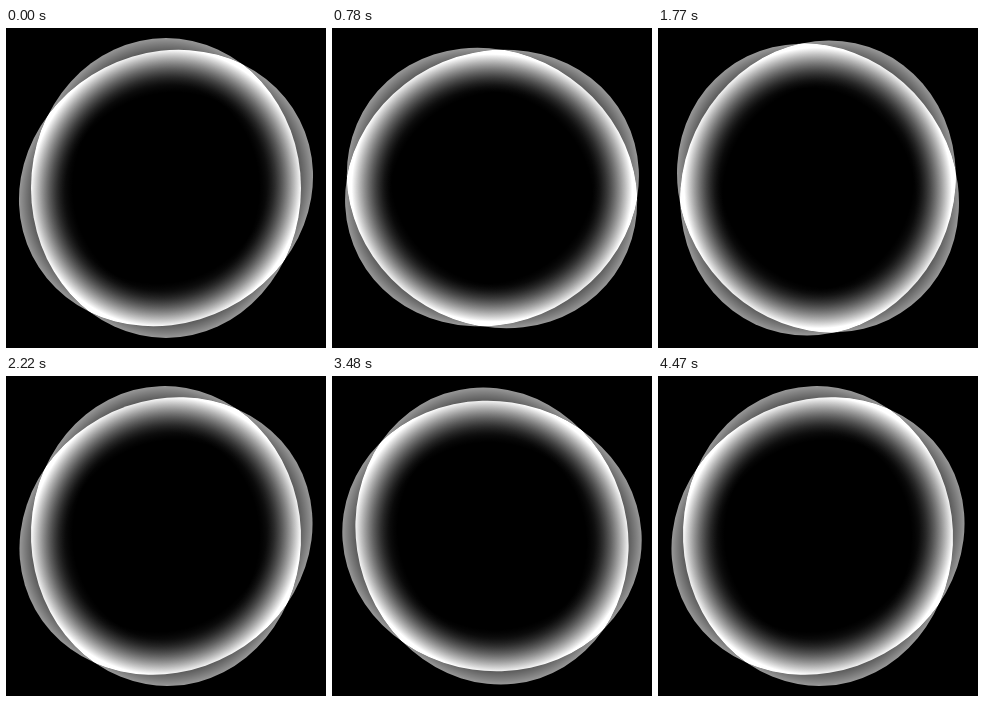
An HTML page with a canvas for the animation above (4500 ms loop, 320 by 320 pixels).

```html
<!DOCTYPE html>
<html lang="en">
<head>
<meta charset="utf-8">
<title>Turning rings</title>
<style>
  html, body { margin: 0; width: 100%; height: 100%; overflow: hidden; background: #000; }
  canvas { display: block; width: 320px; height: 320px; }
</style>
</head>
<body>
<canvas id="stage" width="320" height="320"></canvas>
<script>
const ctx = document.getElementById('stage').getContext('2d');
const SIZE = 320;
const LOOP = 4500;
const STEP = 30;
const LONG = 150;
const SHORT = 135;
const GLOW_DEPTH = 0.31;   // share of the radius that the glow reaches inward
const EDGE_LIGHT = 0.6;
const START_ANGLES = [-27, 90];

// Brightest at the rim, easing out to nothing toward the centre.
function makeGlow() {
  const glow = ctx.createRadialGradient(0, 0, 0, 0, 0, 1);
  const stops = 12;
  for (let i = 0; i <= stops; i++) {
    const k = i / stops;
    const light = EDGE_LIGHT * Math.pow(k, 1.5);
    glow.addColorStop(1 - GLOW_DEPTH * (1 - k), `rgba(255,255,255,${light})`);
  }
  return glow;
}

const glow = makeGlow();

function drawRing(degrees) {
  ctx.save();
  ctx.translate(SIZE / 2, SIZE / 2);
  ctx.rotate(degrees * Math.PI / 180);
  ctx.scale(LONG, SHORT);
  ctx.fillStyle = glow;
  ctx.beginPath();
  ctx.arc(0, 0, 1, 0, Math.PI * 2);
  ctx.fill();
  ctx.restore();
}

function draw(ms) {
  const time = Math.floor((ms % LOOP) / STEP) * STEP;
  const turn = 360 * time / LOOP;
  ctx.globalCompositeOperation = 'source-over';
  ctx.fillStyle = '#000';
  ctx.fillRect(0, 0, SIZE, SIZE);
  ctx.globalCompositeOperation = 'lighter';
  START_ANGLES.forEach(angle => drawRing(angle + turn));
}

let start;
function tick(now) {
  start ??= now;
  draw(Math.max(0, now - start));
  requestAnimationFrame(tick);
}

draw(0);
requestAnimationFrame(tick);
</script>
</body>
</html>
```
